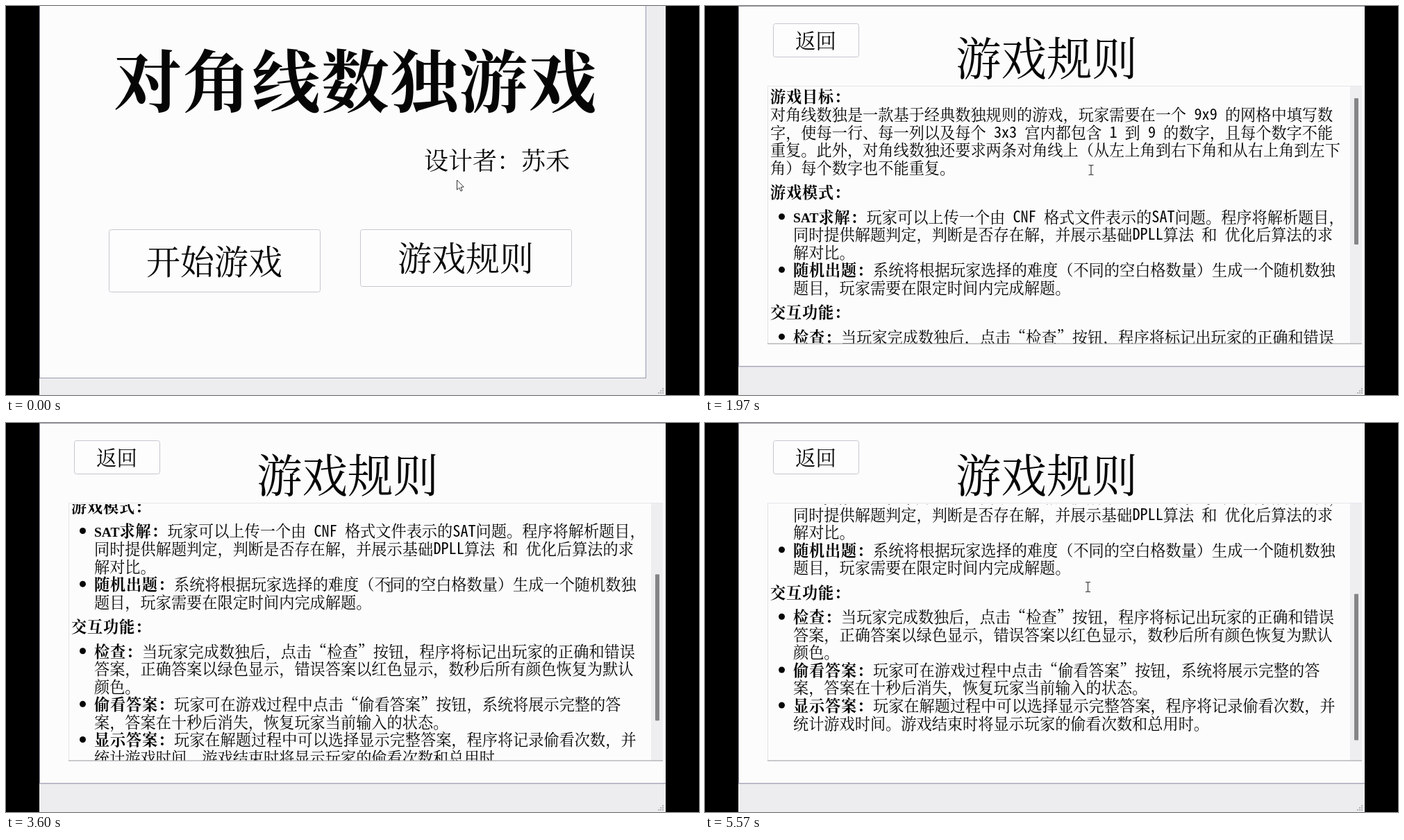
An HTML page with a canvas that plays this animation: 998x561 px, repeating every 5.6 s.

```html
<!DOCTYPE html>
<html lang="zh-CN">
<head>
<meta charset="utf-8">
<title>对角线数独游戏</title>
<style>
html, body { margin: 0; width: 100%; height: 100%; overflow: hidden; background: #000; }
canvas { display: block; width: 998px; height: 561px; }
</style>
</head>
<body>
<canvas id="stage"></canvas>
<script>
const W = 998, H = 561, LOOP = 5600;
const SWITCH_AT = 630;
const WHEEL_AT = [2480, 2780, 3360, 3900];
const WHEEL_STEP = 49.4, THUMB_STEP = 28.4;
const CJK = '"Noto Serif CJK SC", "Noto Sans CJK SC", "Noto Sans CJK", serif';
const MONO = '"Noto Sans Mono CJK SC", "Liberation Mono", monospace';
const PAPER = '#fcfcfc', MARGIN = '#ededf0', INK = '#060606';
const CELL = 22.2, BOLD_CELL = 23;

const canvas = document.getElementById('stage');
const ctx = canvas.getContext('2d');
const dpr = window.devicePixelRatio || 1;
canvas.width = W * dpr;
canvas.height = H * dpr;

// Latin size at which one character is half a cell wide
ctx.font = `100px ${MONO}`;
const LATIN_SIZE = CELL / 2 / ctx.measureText('M').width * 100;

// First character: # heading, * bullet, - continued bullet, = body text
const RULES = [
  '#游戏目标：',
  '=对角线数独是一款基于经典数独规则的游戏，玩家需要在一个 9x9 的网格中填写数',
  '=字，使每一行、每一列以及每个 3x3 宫内都包含 1 到 9 的数字，且每个数字不能',
  '=重复。此外，对角线数独还要求两条对角线上（从左上角到右下角和从右上角到左下',
  '=角）每个数字也不能重复。',
  '#游戏模式：',
  '*SAT求解：玩家可以上传一个由 CNF 格式文件表示的SAT问题。程序将解析题目，',
  '-同时提供解题判定，判断是否存在解，并展示基础DPLL算法 和 优化后算法的求',
  '-解对比。',
  '*随机出题：系统将根据玩家选择的难度（不同的空白格数量）生成一个随机数独',
  '-题目，玩家需要在限定时间内完成解题。',
  '#交互功能：',
  '*检查：当玩家完成数独后，点击“检查”按钮，程序将标记出玩家的正确和错误',
  '-答案，正确答案以绿色显示，错误答案以红色显示，数秒后所有颜色恢复为默认',
  '-颜色。',
  '*偷看答案：玩家可在游戏过程中点击“偷看答案”按钮，系统将展示完整的答',
  '-案，答案在十秒后消失，恢复玩家当前输入的状态。',
  '*显示答案：玩家在解题过程中可以选择显示完整答案，程序将记录偷看次数，并',
  '-统计游戏时间。游戏结束时将显示玩家的偷看次数和总用时。'
];

function rect(x, y, w, h, color) {
  ctx.fillStyle = color;
  ctx.fillRect(x, y, w, h);
}

function write(text, x, midY, size, pitch = size, weight = 300) {
  ctx.font = `${weight} ${size}px ${CJK}`;
  ctx.letterSpacing = (pitch - size) + 'px';
  ctx.fillStyle = INK;
  ctx.fillText(text, x, midY + size * 0.38);
  ctx.letterSpacing = '0px';
}

// Full-width characters take one cell, Latin characters half a cell
function writeMixed(text, x, midY, bold) {
  const cell = bold ? BOLD_CELL : CELL;
  for (const run of text.match(/[ -~]+|[^ -~]+/g) || []) {
    if (/[ -~]/.test(run[0])) {
      ctx.font = bold ? 'bold 19.5px "Liberation Serif", serif'
                      : `300 ${LATIN_SIZE}px ${MONO}`;
      ctx.fillStyle = INK;
      ctx.fillText(run, x, midY + 7.5);
      x += run.length * (bold ? 12.2 : CELL / 2);
    } else {
      write(run, x, midY, CELL, cell, bold ? 600 : 300);
      x += run.length * cell;
    }
  }
  return x;
}

function button(x, y, w, h) {
  ctx.beginPath();
  ctx.roundRect(x + 0.5, y + 0.5, w, h, 3);
  ctx.fillStyle = '#fdfdfd';
  ctx.fill();
  ctx.strokeStyle = '#c6c6d0';
  ctx.lineWidth = 1;
  ctx.stroke();
}

function grip() {
  for (let row = 0; row < 3; row++)
    for (let col = 2 - row; col < 3; col++)
      rect(939 + col * 3, 551 + row * 3, 2, 2, '#b4b4b6');
}

function homePage() {
  rect(48, 0, 874, 537, PAPER);
  rect(48, 0, 1, 537, '#9a9aac');
  rect(921, 0, 1, 537, '#9a9aac');
  rect(48, 536, 874, 1, '#9a9aac');
  write('对角线数独游戏', 155, 108, 98, 99.6, 600);
  write('设计者：苏禾', 602, 223, 35);
  button(148, 322, 304, 90);
  write('开始游戏', 202, 368, 49);
  button(510, 322, 304, 82);
  write('游戏规则', 564, 363, 49);
}

function rulesText(scroll) {
  ctx.save();
  ctx.beginPath();
  ctx.rect(91, 117, 838, 370);
  ctx.clip();
  let y = 131 - scroll, last = '';
  for (const line of RULES) {
    const kind = line[0], text = line.slice(1);
    if (last) y += kind === '#' || (kind === '*' && last === '#') ? 35.5 : 25.55;
    last = kind;
    if (kind === '#') {
      writeMixed(text, 94, y, true);
    } else if (kind === '*') {
      const cut = text.indexOf('：') + 1;
      ctx.beginPath();
      ctx.arc(110.5, y - 0.5, 4.5, 0, Math.PI * 2);
      ctx.fillStyle = INK;
      ctx.fill();
      const x = writeMixed(text.slice(0, cut), 127, y, true);
      writeMixed(text.slice(cut), x, y, false);
    } else {
      writeMixed(text, kind === '-' ? 127 : 94, y, false);
    }
  }
  ctx.restore();
}

function rulesPage(notches) {
  rect(48, 0, 902, 520, PAPER);
  rect(48, 0, 902, 1, '#9c9ca6');
  rect(48, 0, 1, 520, '#9a9aac');
  rect(48, 519, 902, 1.5, '#a9a9ba');
  button(98, 25, 123, 48);
  write('返回', 130, 50, 29.5);
  write('游戏规则', 361, 75, 65.5);
  rect(90, 115, 856, 1, '#e6e6ec');
  rect(90, 115, 1, 372, '#e2e2e9');
  rect(929, 116, 17, 371, '#eeeef1');
  rulesText(notches * WHEEL_STEP);
  rect(90, 486.5, 856, 1, '#98989e');
  ctx.beginPath();
  ctx.roundRect(935, 133 + notches * THUMB_STEP, 6, 211, 1);
  ctx.fillStyle = '#858587';
  ctx.fill();
}

function arrow(x, y) {
  const pts = [[0, 0], [0, 14], [3.3, 11], [5.5, 16], [7.6, 15], [5.5, 10.3], [9.8, 10]];
  ctx.beginPath();
  for (const [dx, dy] of pts) ctx.lineTo(x + dx, y + dy);
  ctx.closePath();
  ctx.fillStyle = '#fff';
  ctx.fill();
  ctx.strokeStyle = '#333';
  ctx.lineWidth = 1;
  ctx.stroke();
}

function beam(x, y) {
  ctx.beginPath();
  for (const s of [-1, 1]) {
    ctx.moveTo(x - 3.5, y + s * 7);
    ctx.lineTo(x - 1, y + s * 7);
    ctx.lineTo(x, y + s * 6);
    ctx.lineTo(x + 1, y + s * 7);
    ctx.lineTo(x + 3.5, y + s * 7);
  }
  ctx.moveTo(x, y - 6);
  ctx.lineTo(x, y + 6);
  ctx.strokeStyle = '#333';
  ctx.lineWidth = 1.1;
  ctx.stroke();
}

const PATH = [
  [0, 649.5, 251], [80, 649.5, 251], [520, 656, 364], [1150, 656, 364],
  [1740, 556, 236.5], [2400, 556, 236.5], [2900, 553.5, 236.5],
  [3500, 551.5, 236.5], [LOOP, 551.5, 236.5]
];

function pointer(t) {
  const i = PATH.findIndex(p => p[0] > t);
  const [t0, x0, y0] = PATH[i - 1], [t1, x1, y1] = PATH[i];
  const u = (t - t0) / (t1 - t0), k = u * u * (3 - 2 * u);
  return [x0 + (x1 - x0) * k, y0 + (y1 - y0) * k];
}

function draw(t) {
  ctx.setTransform(dpr, 0, 0, dpr, 0, 0);
  rect(0, 0, W, H, '#000');
  rect(48, 0, 902, H, MARGIN);
  grip();
  if (t < SWITCH_AT) {
    homePage();
    arrow(...pointer(t));
  } else {
    rulesPage(WHEEL_AT.filter(at => t >= at).length);
    beam(...pointer(t));
  }
}

function tick() {
  draw(performance.now() % LOOP);
  requestAnimationFrame(tick);
}
tick();
</script>
</body>
</html>
```
